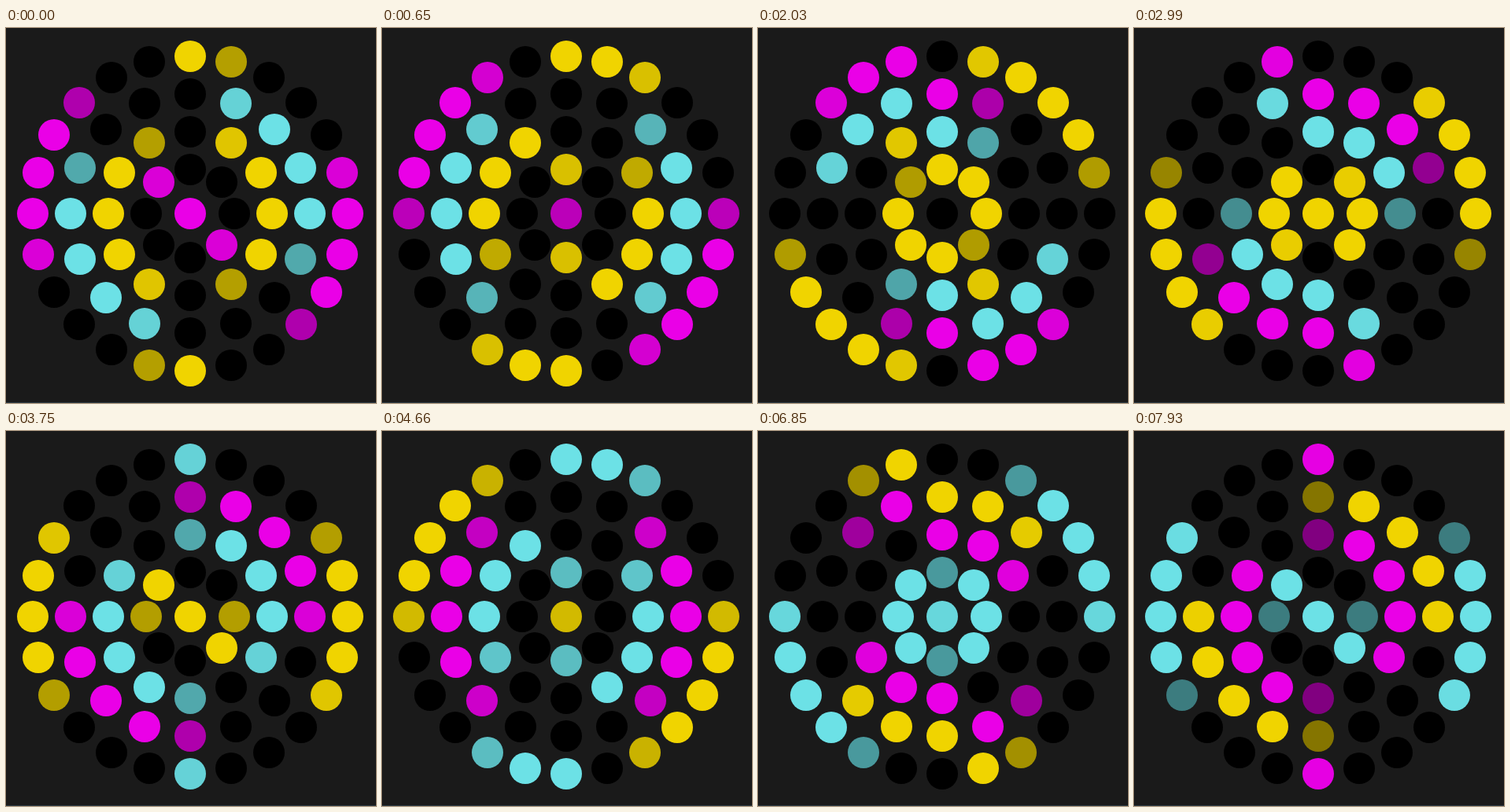
Write an HTML page with a canvas that moves like this. It is 470 px wide and 477 px high and loops after 8000 ms.

```html
<!DOCTYPE html>
<html>
<head>
<meta charset="utf-8">
<style>
  html, body { margin: 0; width: 100%; height: 100%; overflow: hidden; background: #1a1a1a; }
  canvas { display: block; }
</style>
</head>
<body>
<canvas id="stage" width="470" height="477"></canvas>
<script>
const ctx = document.getElementById('stage').getContext('2d');
const LOOP = 8000;
const SPEED = 11 / 5610;   // dots per ms
const START = -0.176;      // wave position at time 0, in dots
const GAP = 8;             // dots between two arcs
const COLORS = [[234, 0, 231], [108, 225, 230], [240, 212, 0]];

// phase: where the magenta arc is centred at the start
const RINGS = [
  { count: 1, radius: 0, phase: 1 },
  { count: 8, radius: 56, phase: 5 },
  { count: 12, radius: 104, phase: 11 },
  { count: 16, radius: 152, phase: 19 },
  { count: 24, radius: 200, phase: 7 }
];

const dots = RINGS.flatMap(({ count, radius, phase }) =>
  Array.from({ length: count }, (_, i) => {
    const angle = i / count * 2 * Math.PI;
    return {
      x: Math.round(234 + radius * Math.sin(angle)),
      y: Math.round(236 - radius * Math.cos(angle)),
      // both halves of a ring show the same pattern
      place: (count > 1 ? i % (count / 2) : 0) - phase
    };
  }));

const mod = (a, n) => ((a % n) + n) % n;

// Brightness by distance from the middle of an arc
function level(d) {
  if (d >= 2.5) return 0;
  const x = Math.max(0, (d - 1.4) / 1.17);
  return Math.sqrt(1 - x * x);
}

function draw(time) {
  const shift = START + (time % LOOP) * SPEED;
  ctx.fillStyle = '#1a1a1a';
  ctx.fillRect(0, 0, 470, 477);
  ctx.fillStyle = '#2b3a42';
  ctx.fillRect(0, 476, 470, 1);
  for (const { x, y, place } of dots) {
    const u = mod(place - shift + GAP / 2, GAP * COLORS.length);
    const light = level(Math.abs(u % GAP - GAP / 2));
    const rgb = COLORS[Math.floor(u / GAP)].map(c => Math.round(c * light));
    ctx.fillStyle = `rgb(${rgb})`;
    ctx.beginPath();
    ctx.arc(x, y, 20, 0, 2 * Math.PI);
    ctx.fill();
  }
}

const begin = performance.now();
function tick() {
  draw(performance.now() - begin);
  requestAnimationFrame(tick);
}
tick();
</script>
</body>
</html>
```
